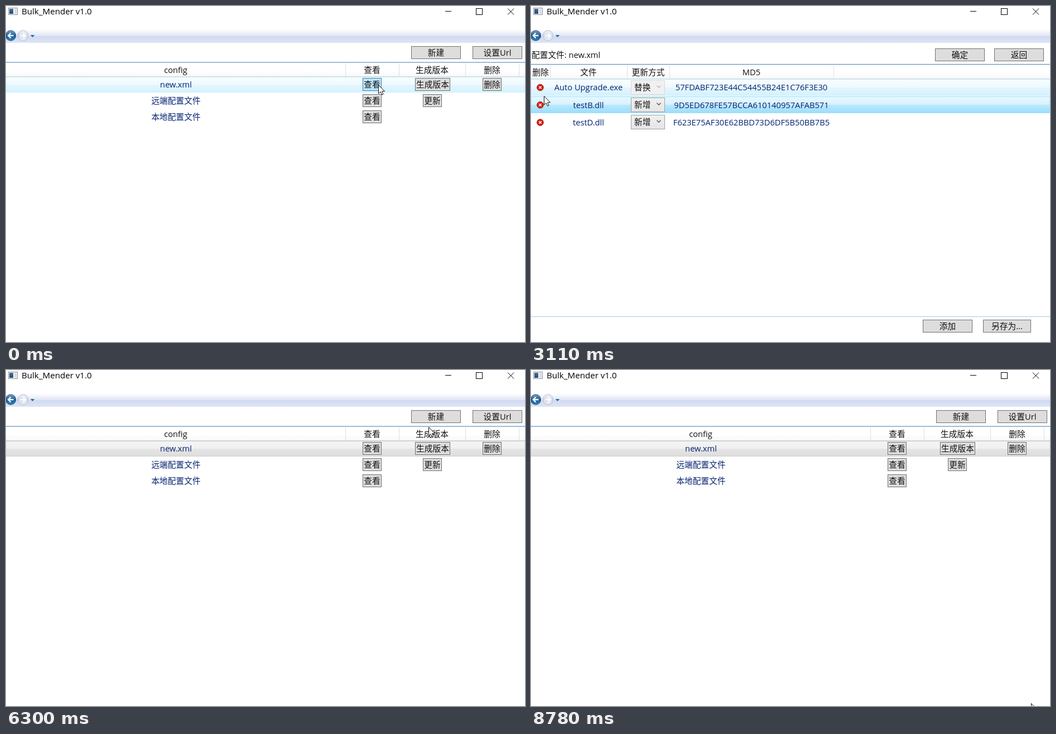
Write an HTML page with a canvas that moves like this. It is 930 px wide and 602 px high and loops after 8.86 s.

```html
<!DOCTYPE html>
<html lang="zh-CN">
<head>
<meta charset="utf-8">
<title>Bulk_Mender</title>
<style>
html, body { margin: 0; width: 930px; height: 602px; overflow: hidden; background: #fff; }
canvas { display: block; width: 930px; height: 602px; }
</style>
</head>
<body>
<canvas id="stage"></canvas>
<script>
const W = 930, H = 602, LOOP = 8860, STEP = 77;
const FONT = '"Open Sans", "Noto Sans CJK SC", "Noto Sans CJK JP", "Noto Sans CJK", sans-serif';
const NAVY = '#042271', INK = '#111', GREY = '#6d6d6d';
const canvas = document.getElementById('stage');
const dpr = window.devicePixelRatio || 1;
canvas.width = W * dpr;
canvas.height = H * dpr;
const c = canvas.getContext('2d');

// Moments of the story.
const VIEW = 290, DROP = 1460, PICK = 2250, REMOVE = 3500, BROWSE = 4450,
  CHOOSE = 5140, CLOSE = 5380, CONFIRM = 6300, REVIEW = 7370, BACK = 8150;

// Pointer moves: start, end, x, y; it rests in between.
const moves = [
  [0, 130, 667, 141], [VIEW, 1000, 222, 171], [1150, 1310, 222, 176], [DROP, 2100, 210, 207],
  [PICK, 2400, 64, 185], [2570, 2880, 27, 174], [3110, 3350, 17, 141], [REMOVE, 4370, 745, 570],
  [BROWSE, 4670, 507, 412], [4750, 5300, 345, 316], [CLOSE, 5450, 342, 314], [5530, 6070, 768, 85],
  [CONFIRM, 6530, 738, 130], [6670, 6900, 680, 238], [6980, 7220, 656, 140],
  [REVIEW, 7610, 760, 112], [7760, 8070, 874, 87], [BACK, 8630, 893, 538], [8690, 8780, 896, 597]
];
const exe = ['Auto Upgrade.exe', '57FDABF723E44C54455B24E1C76F3E30'];
const libB = ['testB.dll', '9D5ED678FE57BCCA610140957AFAB571'];
const libD = ['testD.dll', 'F623E75AF30E62BBD73D6DF5B50BB7B5'];
const libE = ['testE.dll', '3A3EA00CFC35332CEDF6E5E9A32E94DA'];

let now = 0, mx = 0, my = 0, hot = true;

const clamp = v => Math.max(0, Math.min(1, v));
const between = (a, b) => now >= a && now < b;
const over = (x, y, w, h) => hot && mx >= x && mx < x + w && my >= y && my < y + h;

// Sets the time and the pointer to the current step of the current move.
function advance(t) {
  let m = 0;
  while (m < moves.length - 1 && moves[m + 1][0] <= t) m++;
  const [start, end, x, y] = moves[m], [, , x0, y0] = moves[Math.max(0, m - 1)];
  const last = Math.round((end - start) / STEP), d = (end - start) / last;
  const i = Math.min(last, Math.floor((t - start) / d + 1e-6));
  const k = Math.sin((i + 1) / (last + 1) * Math.PI / 2);
  now = start + i * d;
  mx = x0 + (x - x0) * k;
  my = y0 + (y - y0) * k;
}

function rect(x, y, w, h, fill, line, lw = 1) {
  if (fill) { c.fillStyle = fill; c.fillRect(x, y, w, h); }
  if (line) {
    c.strokeStyle = line;
    c.lineWidth = lw;
    c.strokeRect(x + lw / 2, y + lw / 2, w - lw, h - lw);
  }
}

function lines(color, lw, ...runs) {
  c.strokeStyle = color;
  c.lineWidth = lw;
  c.beginPath();
  for (const r of runs)
    for (let i = 0; i < r.length; i += 2) i ? c.lineTo(r[i], r[i + 1]) : c.moveTo(r[0], r[1]);
  c.stroke();
}

function cross(x, y, r, color, lw) {
  lines(color, lw, [x - r, y - r, x + r, y + r], [x + r, y - r, x - r, y + r]);
}

function shape(fill, line, ...p) {
  c.beginPath();
  for (let i = 0; i < p.length; i += 2) c.lineTo(p[i], p[i + 1]);
  c.closePath();
  if (fill) { c.fillStyle = fill; c.fill(); }
  if (line) { c.strokeStyle = line; c.lineWidth = 1; c.stroke(); }
}

function caret(x, y, r, color) {
  shape(color, null, x - r, y - r / 2, x + r, y - r / 2, x, y + r / 2);
}

function arc(x, y, r, color, lw, from = 0, to = 7) {
  c.beginPath();
  c.arc(x, y, r, from, to);
  c.strokeStyle = color;
  c.lineWidth = lw;
  c.stroke();
}

function disc(x, y, r, fill, line) {
  c.beginPath();
  c.arc(x, y, r, 0, 7);
  c.fillStyle = fill;
  c.fill();
  if (line) arc(x, y, r, line, 1);
}

// y is the middle of the line.
function text(s, x, y, color = INK, align = 'left', size = 14.7) {
  c.font = size + 'px ' + FONT;
  c.textAlign = align;
  c.fillStyle = color;
  c.fillText(s, x, y + 5.2);
}

function fade(y, h, ...stops) {
  const g = c.createLinearGradient(0, y, 0, y + h);
  stops.forEach((s, i) => g.addColorStop(i / (stops.length - 1), s));
  return g;
}

function chevron(x, y, r, dir, color = '#666', lw = 1.4) {
  const [dx, dy] = { down: [0, 1], up: [0, -1], left: [-1, 0], right: [1, 0] }[dir];
  const a = r / 2;
  lines(color, lw, [x - dx * a - dy * r, y - dy * a - dx * r, x + dx * a, y + dy * a,
    x - dx * a + dy * r, y - dy * a + dx * r]);
}

function button(x, y, w, label, pressed) {
  const hover = over(x, y, w, 23);
  const fill = !hover ? '#ddd' : pressed ? '#c4e5f6' : '#bee6fd';
  rect(x, y, w, 23, fill, !hover ? '#707070' : pressed ? '#2c628b' : '#3c7fb1');
  text(label, x + w / 2, y + 11.5, INK, 'center');
}

const rowLooks = {
  hover: ['#f1fbff', '#d5f1fe', '#ccf0ff'],
  selected: ['#d9f4ff', '#9bddfb', '#98ddfb'],
  selHover: ['#eaf9ff', '#c9edfd', '#98ddfb'],
  idle: ['#eeeded', '#dddddd', '#cfcfcf']
};
function rowBack(y, h, look) {
  if (!look) return;
  const [a, b, edge] = rowLooks[look];
  rect(0, y, W, h, fade(y, h, a, b));
  rect(1, y + 1, W - 2, h / 2 - 1, 'rgba(255,255,255,.4)');
  rect(0, y, W, 1, edge);
  rect(0, y + h - 1, W, 1, edge);
}

function header(y, seps, labels) {
  rect(0, y, W, 25, fade(y, 25, '#fff', '#fff', '#f7f8fa'));
  rect(0, y + 24, W, 1, '#d5d5d5');
  let left = 0;
  seps.forEach((x, i) => {
    rect(x, y + 1, 1, 24, '#dcdfe4');
    text(labels[i], (left + x) / 2, y + 12.5, INK, 'center');
    left = x;
  });
}

function appIcon(x, y) {
  rect(x, y, 17, 13, '#f4f6f8', '#8b929a');
  rect(x + 2, y + 2, 7, 9, fade(y, 13, '#52789f', '#1d3f69'));
  rect(x + 11, y + 2, 4, 9, '#d6dde6');
}

function navButton(x, dir, stops, edge) {
  disc(x, 53, 9.2, fade(43, 20, ...stops), edge);
  lines('#fff', 2.4, [x - 5 * dir, 53, x + 5 * dir, 53],
    [x, 48.5, x + 4.5 * dir, 53, x, 57.5]);
}

function chrome(active) {
  const ink = active ? '#000' : '#999';
  rect(0, 0, W, H, '#fff');
  appIcon(4, 3);
  text('Bulk_Mender v1.0', 28, 10, ink, 'left', 15.1);
  lines(ink, 1, [787, 9.5, 798, 9.5]);
  rect(842, 4, 12, 12, null, ink);
  cross(904.5, 10, 5.5, ink, 1);

  rect(0, 42, W, 12, fade(42, 12, '#fff', '#e0e5f3'));
  rect(0, 54, W, 12, fade(54, 12, '#d0d9ef', '#dde5f5'));
  navButton(8.5, -1, ['#7ba9cf', '#1e5a94', '#2e86c4'], '#3b5f86');
  navButton(30.5, 1, ['#f4f6fb', '#d3dbe9', '#eef2f9'], '#b3bed1');
  caret(47.5, 54, 3.8, '#1c6cad');
}

function listPage(after) {
  const press = between(130, VIEW) || between(7220, REVIEW);
  button(726, 72, 89, '新建');
  button(836, 72, 89, '设置Url');
  rect(0, 100, W, 2, '#9cbcd9');
  header(102, [608, 704, 823, 919], ['config', '查看', '生成版本', '删除']);
  ['new.xml', '远端配置文件', '本地配置文件'].forEach((name, i) => {
    const y = 127 + 29 * i, chosen = i === 0 && (press || after);
    const hover = over(0, y, W, 29);
    rowBack(y, 28, hover ? (chosen ? 'selHover' : 'hover') : chosen ? 'idle' : null);
    text(name, 304.5, y + 14, NAVY, 'center');
    button(639, y + 2, 34, '查看', press);
    if (i === 0) {
      button(733, y + 2, 63, '生成版本');
      button(854, y + 2, 34, '删除');
    }
    if (i === 1) button(747, y + 2, 34, '更新');
  });
}

function combo(x, y, label, enabled) {
  const hover = enabled && over(x, y, 61, 26);
  const fill = !enabled ? '#f0f0f0' : hover ? fade(y, 26, '#ecf4fc', '#dcecfc') : fade(y, 26, '#f0f0f0', '#e5e5e5');
  rect(x, y, 61, 26, fill, !enabled ? '#d9d9d9' : hover ? '#7eb4ea' : '#a0a0a0');
  text(label, x + 6, y + 12.7);
  chevron(x + 50, y + 11.5, 3.5, 'down', enabled ? '#555' : '#bbb');
}

function popup(x, y) {
  const k = clamp((now - DROP + 80) / 160), h = 72;
  c.save();
  c.beginPath();
  c.rect(x, y, 70, (h + 6) * k);
  c.clip();
  rect(x + 4, y + 4, 62, h, 'rgba(0,0,0,.25)');
  rect(x + 3, y + 3, 61, h, 'rgba(0,0,0,.3)');
  rect(x, y, 62, h, '#fff', '#646464');
  const at = Math.floor((my - y - 1) / 23.4);
  ['新增', '删除', '替换'].forEach((s, i) => {
    const top = y + 1 + 23.4 * i;
    if (i === at) rect(x + 1, top, 60, 23.4, '#bde3f5', '#26a0da');
    else if (i === 1) rect(x + 1, top, 60, 23.4, '#f0f0f0');
    text(s, x + 6, top + 12);
  });
  c.restore();
}

function filePage() {
  const narrow = now >= CLOSE;
  const rows = narrow ? [libB, libD, libE] : now >= REMOVE ? [libB, libD] : [exe, libB, libD];
  const seps = narrow ? [34, 104, 180, 475] : [34, 172, 248, 542];
  const open = between(DROP, PICK);
  const away = between(BROWSE, 5700);
  text('配置文件: new.xml', 1, 88);
  button(724, 76, 89, '确定');
  button(830, 76, 89, '返回');
  rect(0, 104, W, 1, away ? '#777' : '#4584b2');
  header(106, seps, ['删除', '文件', '更新方式', 'MD5']);
  rows.forEach((row, i) => {
    const mid = 146 + 31.3 * i, y = Math.round(mid - 15);
    const isB = row === libB;
    const chosen = isB && between(DROP, REMOVE);
    const hover = open ? isB : over(0, y, W, 31);
    rowBack(y, 30, chosen ? (hover ? 'selHover' : 'selected') : hover ? 'hover' : null);
    disc(16.5, mid, 5.8, '#d81e10', '#a3160c');
    cross(16.5, mid, 2.2, '#fff', 1.5);
    text(row[0], (seps[0] + seps[1]) / 2, mid, NAVY, 'center');
    const mode = row === exe ? '替换' : isB && now < PICK ? '删除' : '新增';
    combo(seps[1] + 7, Math.floor(mid - 13), mode, row !== exe);
    text(row[1], (seps[2] + seps[3]) / 2, mid, NAVY, 'center');
  });
  rect(0, 556, W, 1, away ? '#777' : '#a5cbe0');
  button(702, 562, 89, '添加');
  button(810, 562, 86, '另存为...');
  if (open) popup(180, 189);
}

function addressBar() {
  lines('#777', 1.3, [123, 95, 123, 83], [118, 88, 123, 83, 128, 88]);
  rect(138, 77, 498, 24, null, '#d9d9d9');
  rect(612, 77, 1, 24, '#d9d9d9');
  rect(144, 81, 11, 15, '#f7d68a');
  text('«', 166, 88, GREY);
  let x = 183;
  ['U 盘 (F:)', '团队项目', 'Debug', 'testTarget'].forEach((s, i) => {
    text(s, x, 89, '#222');
    x += c.measureText(s).width + 25;
    if (i < 3) chevron(x - 13, 89, 3.5, 'right', GREY);
  });
  chevron(601, 90, 4, 'down', GREY);
  arc(624, 89, 5.5, GREY, 1.5, -.6, 4.6);
  shape(GREY, null, 623, 81, 629, 84, 624, 87);
  rect(647, 77, 242, 24, null, '#d9d9d9');
  text('搜索"testTarget"', 656, 89, GREY);
  arc(869, 86, 4, GREY, 1.5);
  lines(GREY, 1.5, [866, 89, 861, 95]);
}

function toolBar(full) {
  if (full) {
    text('组织', 33, 129, '#1e395b');
    caret(70, 129, 4, '#1e395b');
    text('新建文件夹', 109, 129, '#1e395b');
    for (let y = 122; y < 135; y += 5) {
      rect(753, y, 4, 3, null, '#777');
      rect(760, y + 1, 9, 1, '#777');
    }
    caret(786, 129, 4, '#555');
  }
  rect(816, 122, 17, 13, '#fff', '#667c90');
  rect(826, 123, 6, 11, '#4b9bd6');
  disc(868, 128, 9, '#2f86d0', '#2a6aa5');
  text('?', 868, 128, '#fff', 'center');
}

function treeIcon(kind, x, y) {
  if (kind === 'pc') {
    rect(x, y - 6, 13, 9, '#6cb8e8', '#5b8fb5');
    rect(x + 4, y + 4, 7, 2, '#6d8ca3');
  } else if (kind === 'disk') {
    shape('#d5d9dd', null, x, y + 2, x + 4, y, x + 15, y + 2, x + 12, y + 5);
    shape('#777d82', null, x, y + 2, x + 12, y + 5, x + 15, y + 2, x + 15, y + 5, x + 12, y + 8, x, y + 5);
  } else {
    rect(x + 1, y - 7, 10, 14, '#f7cf72');
    rect(x + 5, y - 1, 9, 8, kind);
  }
}

function tree() {
  rect(13, 465, 162, 29, '#d9d9d9');
  [['此电脑', 'pc'], ['3D 对象', '#45b5d8'], ['D:\\', '#3d95dd'], ['D:\\', '#c5dff2'], ['视频', '#65727d'],
    ['图片', '#9ed3ee'], ['音乐', '#3390dd'], ['桌面', '#2f8fd8'], ['本地磁盘 (C:)', 'disk'],
    ['软件 (D:)', 'disk'], ['Code (E:)', 'disk'], ['U 盘 (F:)', 'disk']].forEach(([s, icon], i) => {
    const y = 171 + 28.1 * i;
    treeIcon(icon, i ? 52 : 48, y);
    if (i === 8) rect(51, y - 6, 7, 7, '#2a9be0');
    text(s, i ? 74 : 64, y, '#222');
  });
  rect(177, 148, 18, 346, '#f8f8f8');
  rect(177, 287, 18, 150, '#cdcdcd');
  chevron(186, 157, 4, 'up');
  chevron(186, 484, 4, 'down');
}

function fileList(live, picked) {
  ['名称', '修改日期', '类型', '大小'].forEach((s, i) => {
    const x = [220, 525, 665, 806][i];
    text(s, x, 162, '#5c6a7d');
    if (i) rect(x - 7, 147, 1, 30, '#e2e2e2');
  });
  chevron(367, 148, 4, 'up', '#999');
  const names = ['Auto Upgrade.exe', ...[...'ABCDEF'].map(s => `test${s}.dll`)];
  names.forEach((name, i) => {
    const y = 198.5 + 25.2 * i, dim = GREY;
    const hover = live && mx > 217 && mx < 888 && Math.abs(my - y) < 12.6;
    if (picked && i === 5) rect(217, y - 13, 671, 26, '#cce8ff', '#99d1ff');
    else if (hover) rect(217, y - 13, 671, 26, '#e5f3ff');
    if (i) {
      rect(225, y - 8, 12, 16, '#fff', '#9a9a9a');
      disc(229.5, y - 1, 2.2, '#fff', '#999');
      disc(233, y + 3, 2.2, '#fff', '#999');
    } else appIcon(223, y - 7);
    text(name, 246, y, INK);
    text(i ? `2018/5/28 ${i === 2 ? '15:28' : '14:24'}` : '2018/5/30 15:39', 525, y, dim);
    text(i ? '应用程序扩展' : '应用程序', 665, y, dim);
    text(i ? '1 KB' : '48 KB', 884, y, dim, 'right');
  });
  rect(201, 475, 692, 18, '#f8f8f8');
  rect(220, 475, 646, 18, '#cdcdcd');
  chevron(209, 484, 4, 'left');
  chevron(885, 484, 4, 'right');
}

function dialogFoot(full, picked) {
  text('文件名(N):', 237, 522, '#222', 'right');
  rect(244, 509, 395, 27, '#fff', '#3c96dc');
  chevron(629, 522, 4, 'down');
  if (picked) text('testE.dll', 248, 522, INK);
  else rect(248, 513, 1, 19, '#222');
  if (!full) return;
  rect(653, 509, 221, 26, '#e5e5e5', '#adadad');
  text('Files (*.*)', 657, 522, '#222');
  chevron(863, 522, 4, 'down');
  rect(654, 543, 102, 30, '#e6e9ee', '#0078d7', 2);
  text('打开(O)', 705, 558, '#222', 'center');
  rect(771, 543, 102, 30, '#e6e9ee', '#adadad');
  text('取消', 822, 558, '#222', 'center');
  for (let i = 0; i < 3; i++)
    for (let j = 0; j <= i; j++) rect(891 - 4 * j, 575 + 4 * i, 2, 2, '#aaa');
}

function dialog(a, closing) {
  const k = (.945 + .064 * a) / .98, full = closing || a > .5;
  const picked = now >= CHOOSE;
  const pane = (y, h, alpha, fill = '#fff') => {
    c.globalAlpha = alpha;
    rect(12, y, 884, h, fill);
  };
  c.save();
  c.translate(454, 311);
  c.scale(k, k);
  c.translate(-454, -311);
  c.globalAlpha = a * .12;
  rect(8, 32, 892, 562, null, '#000', 4);
  pane(34, 36, Math.sqrt(a));
  pane(70, 34, closing ? a * a * a : a);
  pane(104, 392, a);
  pane(496, 92, a, '#f4f5f9');
  rect(12, 34, 884, 554, null, '#5a9bd8');
  text('打开', 21, 52, '#222');
  if (!closing) cross(875.5, 51.5, 5.5, '#555', 1);
  if (full) addressBar();
  toolBar(full);
  tree();
  fileList(full && !closing, picked);
  dialogFoot(full, picked);
  c.restore();
}

function cursor() {
  c.save();
  c.translate(Math.round(mx) + .5, Math.round(my) + .5);
  shape('#fff', INK, 0, 0, 0, 15.5, 3.6, 12.2, 6, 17.6, 8.5, 16.5, 6.2, 11.3, 11, 11.3);
  c.restore();
}

function draw(t) {
  advance(t);
  const modal = between(BROWSE, CLOSE), closing = now >= CLOSE;
  hot = !modal && !between(DROP, PICK);
  c.setTransform(dpr, 0, 0, dpr, 0, 0);
  c.globalAlpha = 1;
  chrome(!modal);
  if (between(VIEW, CONFIRM) || between(REVIEW, BACK)) filePage();
  else listPage(now >= CONFIRM);
  const a = closing ? clamp(1 - (now - CLOSE) / 155) : clamp((now - 4620) / 220);
  if (a > 0) dialog(a, closing);
  cursor();
}

const begin = performance.now();
function tick() {
  draw((performance.now() - begin) % LOOP);
  requestAnimationFrame(tick);
}
tick();
</script>
</body>
</html>
```
